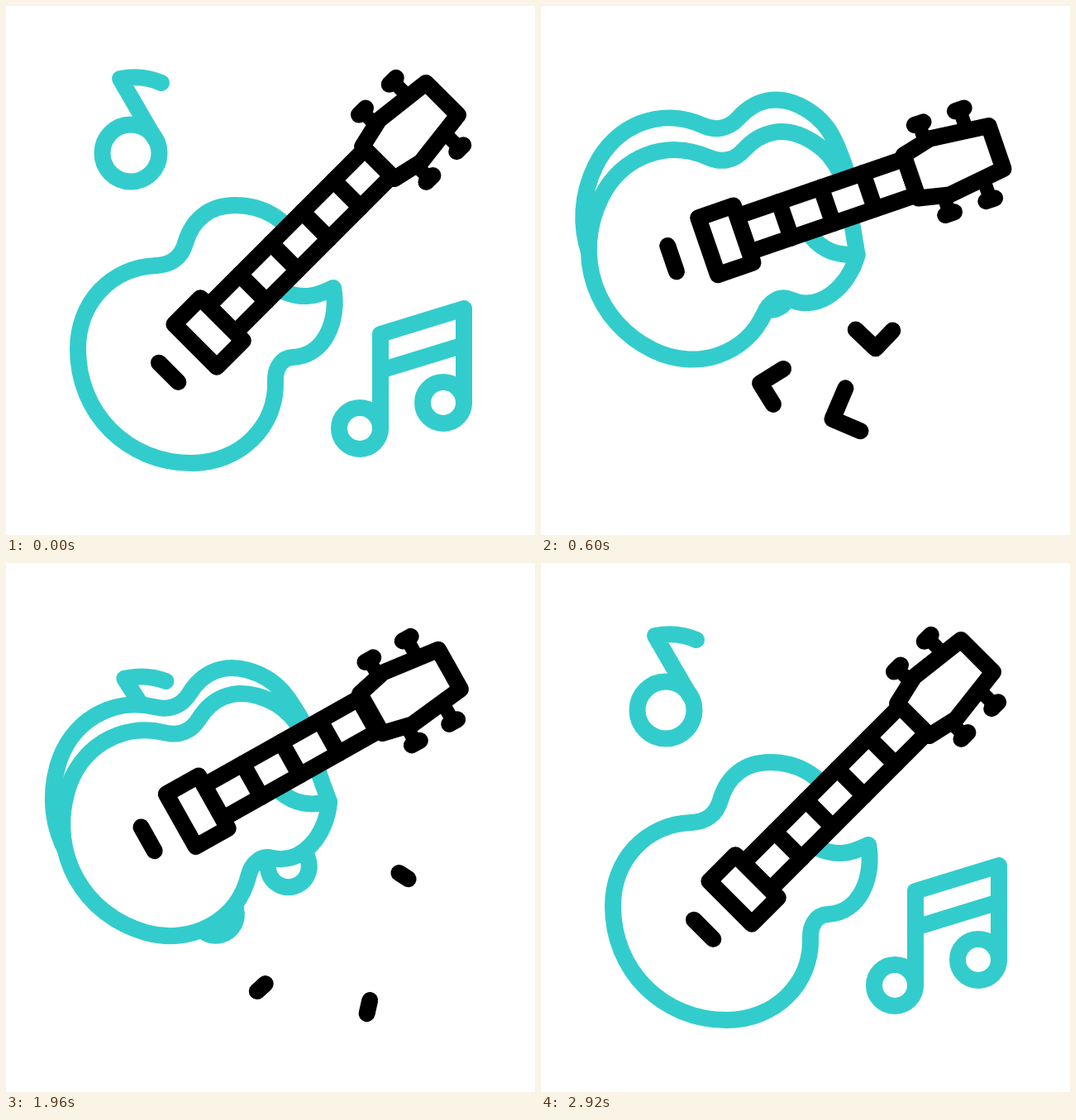
An HTML page with a canvas for the animation above (3000 ms loop, 640 by 640 pixels).

```html
<!DOCTYPE html>
<html lang="en">
<head>
<meta charset="utf-8">
<title>Guitar and notes</title>
<style>
html, body { margin: 0; width: 100%; height: 100%; overflow: hidden; background: #fff; }
canvas { display: block; }
</style>
</head>
<body>
<canvas id="stage" width="640" height="640"></canvas>
<script>
const ctx = document.getElementById('stage').getContext('2d');
const LOOP = 3000, STEP = 40;
const TEAL = '#33cccc', BLACK = '#000', RAD = Math.PI / 180;
const BRIDGE = [261, 379];   // where the neck meets the bridge block
const PIVOT = [332, 241];    // centre of the swing
const FRET = 53.6;

// Body outline: x, y and heading in degrees; the tip has two headings
const body = [
  [360, 285, 225], [277, 241, 180], [217, 287, 106], [182, 314, 178], [87, 415, 90],
  [225, 553, 0], [326, 453, -92], [347, 425, -2], [396, 341, -101],
  [396, 341, 153], [335, 345, 204]];
const tip = body[8];

// Sparks: x, y, heading, scale
const sparks = [[376, 504, 122, 1], [434, 423, 17.5, 1], [454, 492, 87, 1.23]];
const LEGS = [33, 41, 37];

const clamp = u => Math.max(0, Math.min(1, u));
const power = n => u => u < .5 ? (2 * u) ** n / 2 : 1 - (2 - 2 * u) ** n / 2;
const cubic = power(3), quint = power(5);
const sine = u => (1 - Math.cos(Math.PI * u)) / 2;
const ramp = (t, from, to, ease) => ease(clamp((t - from) / (to - from)));

// Value of a track: time, value, time, value, ...
function track(t, ...keys) {
  let v = keys[1];
  for (let i = 2; i < keys.length; i += 2)
    if (t > keys[i - 2])
      v = keys[i - 1] + (keys[i + 1] - keys[i - 1]) * ramp(t, keys[i - 2], keys[i], sine);
  return v;
}

function paint(color, filled, width = 20) {
  ctx.lineWidth = width;
  ctx.strokeStyle = color;
  if (filled) { ctx.fillStyle = '#fff'; ctx.fill(); }
  ctx.stroke();
}

function line(points, color = BLACK, width = 20) {
  ctx.beginPath();
  points.forEach(p => ctx.lineTo(...p));
  paint(color, false, width);
}

function shape(points) {
  ctx.beginPath();
  points.forEach(p => ctx.lineTo(...p));
  ctx.closePath();
  paint(BLACK, true);
}

const box = (x1, x2, h) => shape([[x1, -h], [x2, -h], [x2, h], [x1, h]]);

function ring(x, y, r) {
  ctx.beginPath();
  ctx.arc(x, y, r, 0, 2 * Math.PI);
  paint(TEAL);
}

// Continue the path smoothly through points with headings
function curve(points, dx = 0, dy = 0) {
  points.forEach(([x, y, a], i) => {
    x += dx; y += dy;
    if (!i) return ctx.lineTo(x, y);
    const [px, py, pa] = points[i - 1];
    const x0 = px + dx, y0 = py + dy, h = .4 * Math.hypot(x - x0, y - y0);
    ctx.bezierCurveTo(x0 + h * Math.cos(pa * RAD), y0 + h * Math.sin(pa * RAD),
      x - h * Math.cos(a * RAD), y - h * Math.sin(a * RAD), x, y);
  });
}

// Draw with a shift and a turn about a point
function moved([cx, cy], dx, dy, deg, draw) {
  ctx.save();
  ctx.translate(cx + dx, cy + dy);
  ctx.rotate(deg * RAD);
  ctx.translate(-cx, -cy);
  draw();
  ctx.restore();
}

function singleNote() {
  ring(151, 178, 34.5);
  ctx.beginPath();
  ctx.moveTo(181, 162);
  ctx.lineTo(138, 88);
  ctx.quadraticCurveTo(165, 83, 188, 93);
  paint(TEAL);
}

function doubleNote() {
  ring(428, 511, 25);
  ring(529, 480, 25);
  line([[453, 511], [453, 397], [554, 366], [554, 480]], TEAL);
  line([[453, 441], [554, 410]], TEAL);
}

// Notes slip behind the body, then spring out again
function notes(t) {
  if (t > 640 && t < 1640) return;
  const leaving = t < 1000;
  const inX = ramp(t, 80, 580, cubic), inY = ramp(t, 80, 640, cubic);
  const left = 1 - ramp(t, 1600, 2260, quint), right = 1 - ramp(t, 1600, 2414, quint);
  const drift = track(t, 2000, 0, 2280, 8, 2600, 0);
  const turnL = track(t, 1600, 0, 1960, -2, 2280, -14, 2580, 3, 2920, 0);
  const turnR = leaving ? track(t, 80, 0, 400, 14, 620, -16.6)
    : track(t, 2240, -16.6, 2580, 3, 2920, 0);
  moved([151, 178], leaving ? 83 * inX : 27 * left + drift,
    leaving ? 153 * inY : 165 * left, turnL, singleNote);
  moved([479, 495], leaving ? -247 * inX : -248 * right + drift / 4,
    leaving ? -124 * inY : -136 * right - drift / 3, turnR, doubleNote);
}

function drawBody(depth) {
  if (depth > .002) {
    ctx.beginPath();
    ctx.moveTo(tip[0], tip[1]);
    ctx.lineTo(tip[0] - 23 * depth, tip[1] - 32 * depth);
    curve(body.slice(0, 6), -23 * depth, -32 * depth);
    paint(TEAL, true);
  }
  ctx.beginPath();
  curve(body);
  paint(TEAL, true);
}

// Drawn along the x axis, starting at the bridge
function drawNeck(length) {
  box(0, length, 23);
  for (let x = FRET; x < length; x += FRET) line([[x, -23], [x, 23]]);
  for (const x of [length + 30, length + 82])
    for (const side of [-1, 1]) {
      line([[x - 5.7, 57.6 * side], [x + 5.7, 57.6 * side]]);
      line([[x, 57.6 * side], [x, 36 * side]], BLACK, 17);
    }
  const half = [[0, 27.5], [37, 36], [109, 27.5]].map(([x, y]) => [x + length, y]);
  shape([...half, ...half.map(([x, y]) => [x, -y]).reverse()]);
  box(-45, 0, 36.5);
  line([[-91, -16.5], [-91, 16.5]]);
}

// Zigzag with right-angled turns, shown between two fractions of its length
function drawSpark([x, y, heading, scale], start, end) {
  const points = [[x, y]];
  let total = 0;
  LEGS.forEach((leg, i) => {
    const a = (heading - 90 * (i % 2)) * RAD;
    x += leg * scale * Math.cos(a);
    y += leg * scale * Math.sin(a);
    total += leg * scale;
    points.push([x, y]);
  });
  ctx.setLineDash([Math.max(.1, total * (end - start)), 2 * total]);
  ctx.lineDashOffset = -total * start;
  line(points);
  ctx.setLineDash([]);
}

function draw(t) {
  ctx.clearRect(0, 0, 640, 640);
  ctx.lineCap = ctx.lineJoin = 'round';
  const tilt = ramp(t, 80, 580, cubic) - ramp(t, 1600, 2640, quint);
  const shrink = ramp(t, 100, 640, cubic) - ramp(t, 1600, 2640, quint);
  const depth = ramp(t, 240, 640, cubic) - ramp(t, 1600, 2500, quint);
  const swing = track(t, 80, 0, 840, 11.7, 1360, 0);
  const lift = track(t, 80, 0, 400, 14, 840, 0);
  const start = ramp(t, 1600, 2065, sine), end = ramp(t, 380, 800, cubic);

  notes(t);
  moved(PIVOT, 0, lift, swing, () =>
    moved(BRIDGE, -11 * tilt, -97.5 * tilt, 17 * tilt, () => {
      drawBody(depth);
      if (end > 0 && start < 1) sparks.forEach(s => drawSpark(s, start, end));
      ctx.translate(...BRIDGE);
      ctx.rotate(-45 * RAD);
      drawNeck(FRET * (5 - shrink));
    }));
}

const begin = performance.now();
function tick() {
  const t = (performance.now() - begin) % LOOP;
  draw(Math.floor(t / STEP) * STEP);
  requestAnimationFrame(tick);
}
tick();
</script>
</body>
</html>
```
